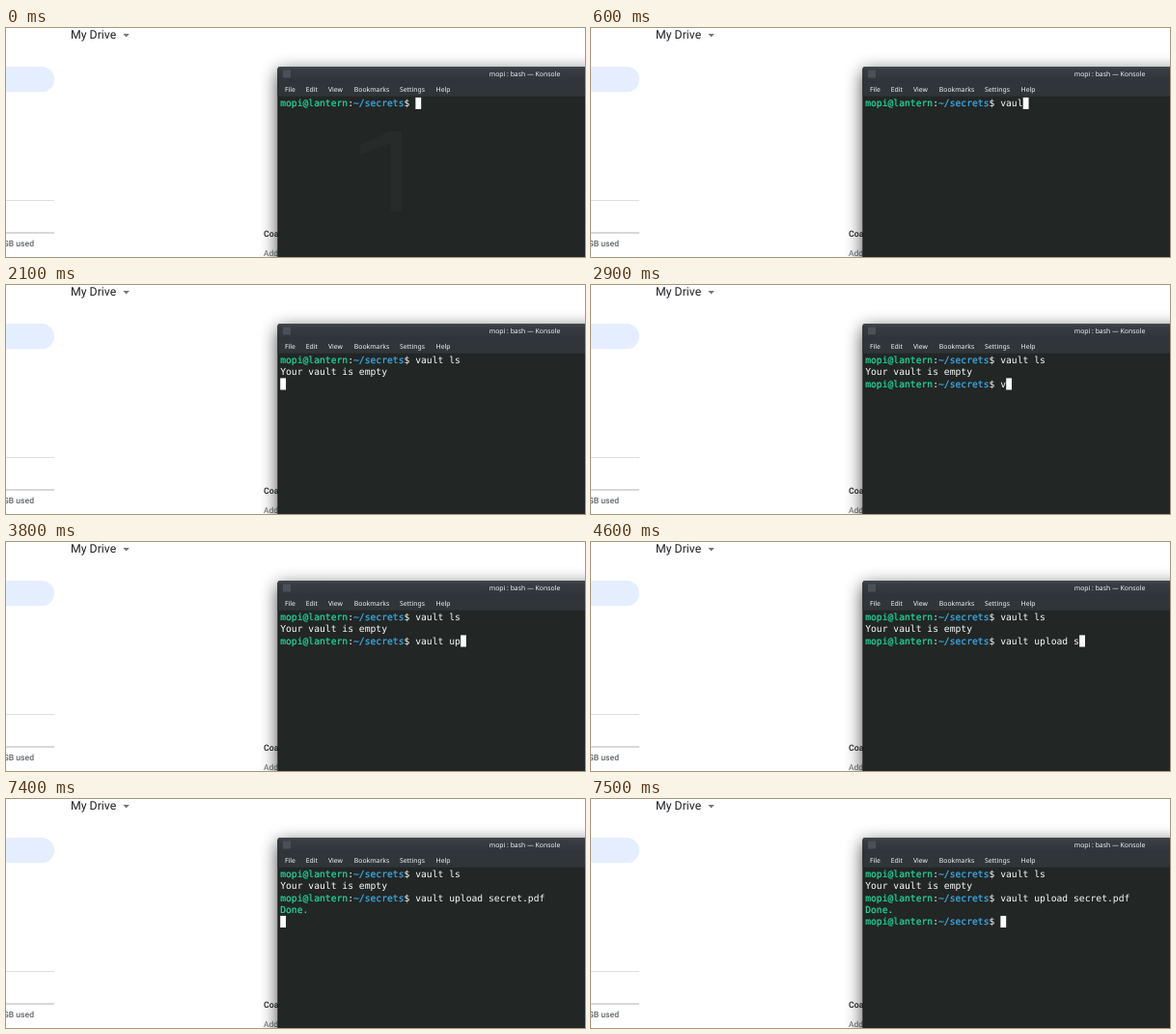
Animation of 600x237 px, one loop 8000 ms. Source, as an HTML page:

```html
<!DOCTYPE html>
<html lang="en">
<head>
<meta charset="utf-8">
<title>Terminal session</title>
<style>
  html, body { margin: 0; width: 100%; height: 100%; overflow: hidden; background: #fff; }
  svg { display: block; width: 600px; height: 237px; }
  text { white-space: pre; text-rendering: geometricPrecision; }
  .page { font-family: Roboto, sans-serif; fill: #202124; }
  .soft { fill: #5f6368; }
  .ui { font: 6.85px "Noto Sans", sans-serif; fill: #f4f5f5; }
  .term { font: 9.7px "DejaVu Sans Mono", monospace; fill: #fcfcfc; }
  .green { fill: #1cdc9a; stroke: #1cdc9a; stroke-width: .2px; }
  .blue { fill: #3daee9; stroke: #3daee9; stroke-width: .2px; }
</style>
</head>
<body>
<svg viewBox="0 0 600 237" xmlns="http://www.w3.org/2000/svg">
  <defs>
    <linearGradient id="bar" x1="0" y1="0" x2="0" y2="1">
      <stop offset="0" stop-color="#434a50"/>
      <stop offset=".2" stop-color="#373d43"/>
      <stop offset="1" stop-color="#2f3439"/>
    </linearGradient>
    <filter id="blur" filterUnits="userSpaceOnUse" x="200" y="0" width="560" height="400">
      <feGaussianBlur stdDeviation="9"/>
    </filter>
  </defs>

  <rect width="600" height="237" fill="#fff"/>

  <!-- file page -->
  <g class="page">
    <text x="67" y="11.3" font-size="12.3">My Drive</text>
    <path d="M121.3 6h6.6l-3.3 3.6z" fill="#757575"/>
    <rect x="-30" y="40" width="80" height="26.3" rx="13.1" fill="#e5eefe"/>
    <rect y="178" width="50" height="1" fill="#dcdee1"/>
    <rect y="211" width="50" height="2" fill="#d6d8db"/>
    <text class="soft" x="29" y="226.3" font-size="8.6" font-weight="500" text-anchor="end">3 GB used</text>
    <text x="267" y="216" font-size="8.8" font-weight="500">Coast Photos</text>
    <text class="soft" x="267" y="235.6" font-size="8.4">Add a folder</text>
  </g>

  <!-- terminal window -->
  <rect x="281.5" y="45" width="420" height="300" fill="#000" opacity=".72" filter="url(#blur)"/>
  <path d="M281.5 237V42.5q0-2.5 2.5-2.5H600V237z" fill="#222625"/>
  <path d="M281.5 56V42.5q0-2.5 2.5-2.5H600V56z" fill="url(#bar)"/>
  <rect x="281.5" y="55.5" width="318.5" height="15.2" fill="#30353a"/>
  <rect x="281.5" y="42" width=".7" height="195" fill="#15181a" opacity=".6"/>
  <rect x="287" y="43.5" width="8" height="8" fill="#4a5055"/>
  <text class="ui" x="537.5" y="50.2" text-anchor="middle">mopi : bash — Konsole</text>
  <g id="menu" class="ui"></g>
  <path id="ghost" d="M398 107H410V190H399V119L367 131V121z" fill="#fff"/>
  <g id="lines" class="term"></g>
  <rect id="cursor" width="5.84" height="12.1" fill="#fcfcfc"/>
</svg>

<script>
const LOOP = 8000, LEFT = 284.2, TOP = 71.9, PITCH = 12.25, CHAR = 5.84;
const NS = 'http://www.w3.org/2000/svg';
const $ = id => document.getElementById(id);

function add(parent, tag, attrs, text = '') {
  const el = document.createElementNS(NS, tag);
  for (const key in attrs) el.setAttribute(key, attrs[key]);
  el.textContent = text;
  parent.append(el);
  return el;
}

[['File', 289], ['Edit', 310.8], ['View', 334], ['Bookmarks', 360.8], ['Settings', 408], ['Help', 445.6]]
  .forEach(([label, x]) => add($('menu'), 'text', { x, y: 65.8 }, label));

const prompt = [['green', 'mopi@lantern'], ['', ':'], ['blue', '~/secrets'], ['', '$ ']];

// Each command: text, [time, characters typed] pairs, enter time, reply time, reply
const commands = [
  { text: 'vault ls',
    keys: [[300, 1], [400, 2], [500, 3], [600, 4], [700, 5], [800, 7], [900, 8]],
    enter: 1000, done: 2100, reply: ['', 'Your vault is empty'] },
  { text: 'vault upload secret.pdf ',
    keys: [[2900, 1], [3000, 2], [3100, 3], [3300, 4], [3400, 5], [3500, 6], [3700, 7], [3800, 8],
           [4000, 9], [4100, 11], [4300, 12], [4400, 13], [4600, 14], [4800, 15], [4900, 16], [5100, 24]],
    enter: 5200, done: 7400, reply: ['green', 'Done.'] },
  { text: '', keys: [], enter: Infinity }
];

function screenAt(t) {
  const rows = [];
  let ready = 0;
  for (const { text, keys, enter, done, reply } of commands) {
    if (t < ready) return [...rows, []];
    const typed = keys.reduce((n, [time, count]) => t >= time ? count : n, 0);
    rows.push([...prompt, ['', text.slice(0, typed)]]);
    if (t < enter) return rows;
    if (t < done) return [...rows, []];
    rows.push([reply]);
    ready = done + 100;
  }
  return rows;
}

let shown = '';
function draw(t) {
  $('ghost').setAttribute('opacity', .022 * Math.max(0, 1 - t / 300));
  const rows = screenAt(t);
  const key = JSON.stringify(rows);
  if (key === shown) return;
  shown = key;

  $('lines').replaceChildren();
  rows.forEach((row, i) => {
    const line = add($('lines'), 'text', { x: LEFT, y: TOP + 9.3 + i * PITCH });
    for (const [color, text] of row) add(line, 'tspan', { class: color }, text);
  });
  const last = rows[rows.length - 1];
  const column = last.reduce((n, [, text]) => n + text.length, 0);
  $('cursor').setAttribute('x', LEFT + column * CHAR);
  $('cursor').setAttribute('y', TOP + (rows.length - 1) * PITCH);
}

const start = performance.now();
function tick() {
  draw((performance.now() - start) % LOOP);
  requestAnimationFrame(tick);
}
tick();
</script>
</body>
</html>
```
